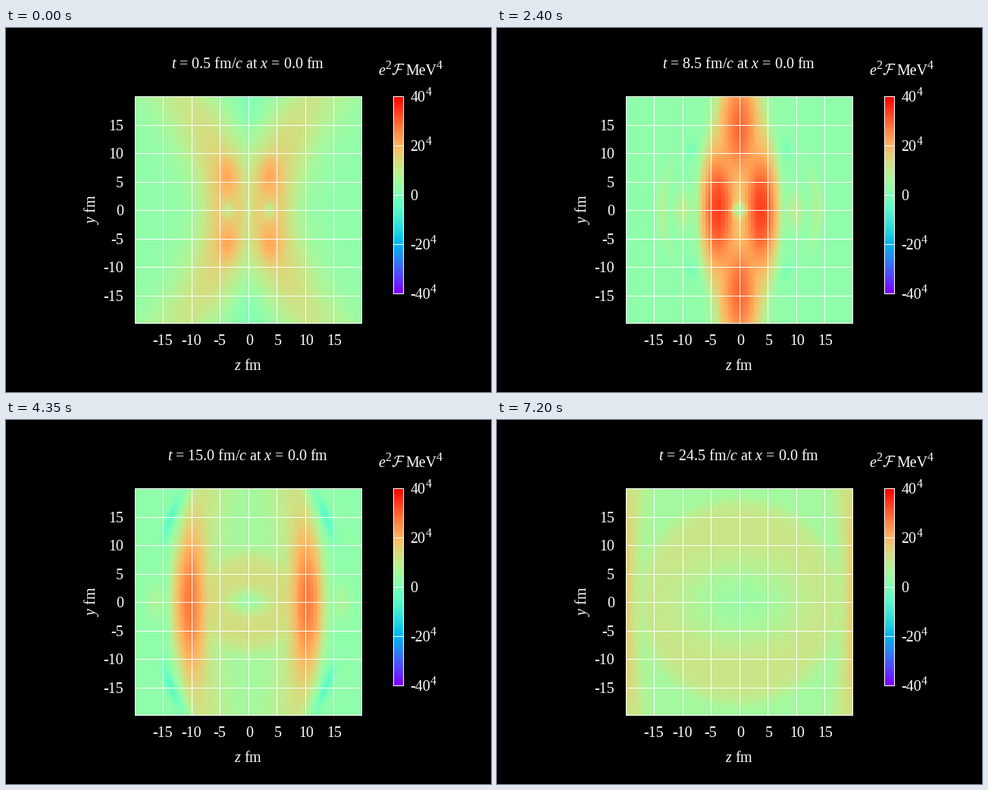
Write a matplotlib script that moves like this. It is 640 px wide and 480 px high and loops after 7350 ms.

```python
import numpy as np
import matplotlib.pyplot as plt
from matplotlib.animation import FuncAnimation
from matplotlib.patches import Rectangle

W, H, DPI = 640, 480, 80
FRAMES, STEP = 49, 150
LEFT, TOP, SIDE, CELLS = 170, 90, 300, 80
MEET = 4.5  # time when both nuclei overlap, fm/c

plt.rcParams.update({
    "font.family": "Liberation Serif",
    "mathtext.fontset": "custom",
    "mathtext.rm": "Liberation Serif",
    "mathtext.it": "Liberation Serif:italic",
})

c = (np.arange(CELLS) + 0.5) / CELLS * 40 - 20
Z, Y = np.meshgrid(c, -c)
A, B = np.abs(Z), np.abs(Y)
NOISE = np.random.default_rng(4).normal(0, 0.4, Z.shape)


def bell(x, w):
    return np.exp(-0.5 * (x / w) ** 2)


def step(x, soft):
    return 1 / (1 + np.exp(-np.clip(x / soft, -40, 40)))


def blend(*parts):
    """Fourth-power sum, matching the fourth-root colour scale."""
    return sum(p ** 4 for p in parts) ** 0.25


def before(t):
    """Two nuclei approaching, with X-shaped arms."""
    d = 0.9 * (MEET - t)
    u = B / 20
    gap = A - 1.15 * d - 1.9 * d * u ** 2
    s = 3 + (15 - 7 * u) * bell(gap, np.where(gap > 0, 3 + 2.2 * u, 5 - u))
    s += 6 * bell(A - d, 1.4) * bell(B - 6.3, 2.2)
    s -= 8 * bell(A - d, 0.8) * bell(B, 1.1)
    s -= 4 * bell(A, 0.5) * bell(B, 1.1)
    s -= 3 * bell(A, 2.2) * bell(B - 19, 4)
    return s + 4 * (t - 0.5) * bell(A, 3 + d)


def after(t):
    """Receding curved discs, a transverse pulse and an expanding ring."""
    n = max(t - MEET, 0)
    d = 0.92 * n + 0.006 * n ** 2
    edge = step(d + 3.8 - 0.01 * B ** 2 - A, 0.55)

    bend = d - 0.0035 * B ** 2 * step(n - 6, 2)
    width = 2.7 - 0.02 * n
    disc = blend(bell(Z - bend, width), bell(Z + bend, width))
    disc = (37.5 - n) * disc * bell(B, 9 + 0.03 * n ** 2) * edge

    pulse = max(38 - 2.3 * n, 0) * bell(A, 2 + 0.25 * n)
    pulse = pulse * bell(B - 3.6 * n, max(18 - 2.2 * n, 5))

    fade = 3.5 + 28 * np.exp(-n / 4)
    wake = (14 - 0.2 * n) * bell(np.maximum(bend - A, 0), fade) * edge
    ring = (14.5 - 0.15 * n) * edge
    ring = ring * step(0.95 * n - 0.5 - np.hypot(Z, Y), 1)

    glow = 9 - 0.3 * n
    outer = glow * bell(A - 9 - 1.15 * n + 0.022 * B ** 2, 0.9) * bell(B, 6.5)
    inner = 1.2 * glow * bell(A - d - 6.1, 1.4) * bell(B, 3)
    s = blend(2.8 + 2.8 * edge, disc, pulse, wake, ring, outer, inner)

    r = np.hypot(Z / (0.8 + 0.023 * n ** 2), Y / (1.3 + 0.0007 * n ** 3))
    s = s * (1 - 0.62 * np.exp(-r ** 2.4))
    streak = bell(A - d - 6 + 0.012 * B ** 2, 0.6)
    streak = streak * bell(B - 8 - 0.65 * n, 0.25 * n + 0.1)
    late = step(n - 13, 1)
    s -= 8.5 * step(n - 4, 0.5) * streak
    s -= 3 * late * bell(Z - 0.5, 0.4) * bell(Y, 0.5)
    return s + late * NOISE * bell(B, 5)


def field(t):
    if t >= MEET:
        return after(t)
    k = (t - 0.5) / (MEET - 0.5)
    k = k * k * (3 - 2 * k)
    return (1 - k) * before(t) + k * after(t)


fig = plt.figure(figsize=(W / DPI, H / DPI), dpi=DPI, facecolor="black")
ax = fig.add_axes([0, 0, 1, 1])
ax.axis("off")


def label(x, y, text, px=20, ha="left", **kw):
    return ax.text(x, y, text, color="white", fontsize=px * 72 / DPI,
                   ha=ha, va="baseline", **kw)


def line(x0, y0, x1, y1):
    """One-pixel line covering both end pixels."""
    ax.add_patch(Rectangle((x0, y0), x1 - x0 + 1, y1 - y0 + 1, lw=0,
                           color="white", antialiased=False, zorder=2))


def box(x0, y0, x1, y1):
    for x in (x0, x1):
        line(x, y0, x, y1)
    for y in (y0, y1):
        line(x0, y, x1, y)


def paint(data, x0, y0, x1, y1):
    return ax.imshow(data, cmap="rainbow", vmin=-40, vmax=40, aspect="auto",
                     extent=(x0, x1, y1, y0), interpolation="nearest")


heat = paint(field(0.5), LEFT, TOP, LEFT + SIDE, TOP + SIDE)
box(LEFT, TOP, LEFT + SIDE - 1, TOP + SIDE - 1)
for v in range(-15, 16, 5):
    gx, gy = int(LEFT + 150 + 7.5 * v), int(TOP + 150.5 - 7.5 * v)
    line(gx, TOP, gx, TOP + SIDE - 1)
    line(LEFT, gy, LEFT + SIDE - 1, gy)
    label(gx + (0 if v < 0 else 1.5), 418, str(v), ha="center")
    label(155, gy + 7, str(v), ha="right")

paint(np.linspace(40, -40, 260)[:, None], 511, 90, 525, 350)
box(511, 90, 524, 350)
for v in range(-40, 41, 20):
    y = int(220 - v * 130 / 40)
    line(511, y, 524, y)
    label(533.5, y + 7, str(v))
    if v:
        label(553.5 + (6.7 if v < 0 else 0), y - 1, "4", 16)

label(319, 451, r"$\mathit{z}$ fm", ha="center")
label(118, 239.5, r"$\mathit{y}$ fm", ha="center", rotation=90,
      rotation_mode="anchor")
label(491, 61.5, "e", style="italic")
label(500, 53.5, "2", 16)
label(508, 61.5, r"$\mathcal{F}$", math_fontfamily="cm")
label(527, 61.5, "MeV")
label(568, 53.5, "4", 16)
title = label(319, 53, "", ha="center")

ax.set_xlim(0, W)
ax.set_ylim(H, 0)


def update(i):
    t = 0.5 * (i + 1)
    heat.set_data(field(t))
    title.set_text(rf"$\mathit{{t}}$ = {t:.1f} fm/$\mathit{{c}}$ at "
                   r"$\mathit{x}$ = 0.0 fm")
    return heat, title


anim = FuncAnimation(fig, update, frames=FRAMES, interval=STEP,
                     repeat=True, repeat_delay=0)
plt.show()
```
